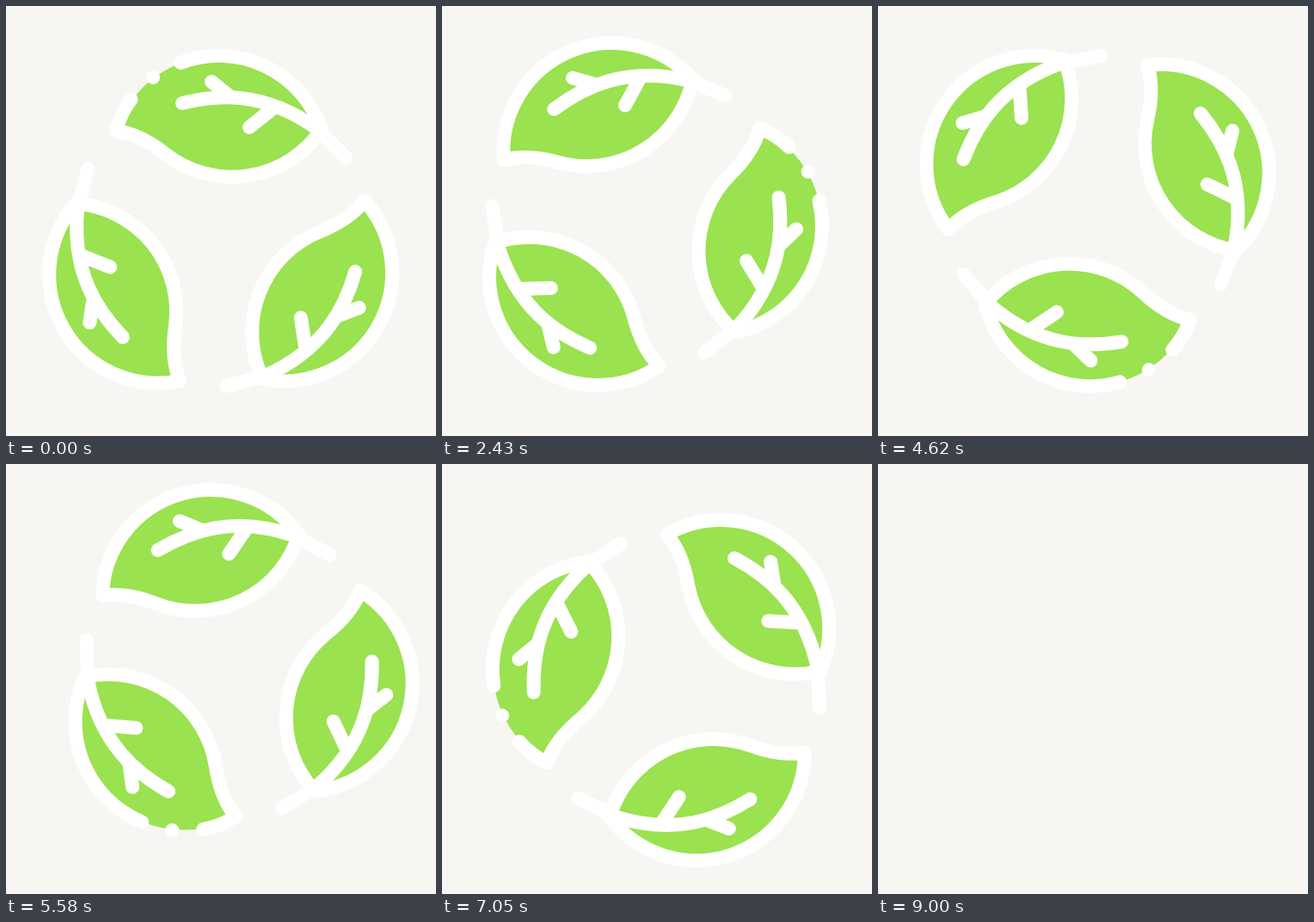
An HTML page for the animation above (9.03 s loop, 500 by 500 pixels).

```html
<!DOCTYPE html>
<html lang="en">
<head>
<meta charset="utf-8">
<title>Leaf cycle</title>
<style>
  html, body { margin: 0; height: 100%; overflow: hidden; background: #f7f6f2; }
  svg { display: block; width: 100vw; height: 100vh; }
</style>
</head>
<body>
<svg viewBox="0 0 500 500" fill="none" stroke="#fff" stroke-width="16" stroke-linecap="round" stroke-linejoin="round">
  <defs>
    <path id="blade" d="M128 145A126 126 0 0 1 367 143.6A126 126 0 0 1 186 172.5C169 159 150 148 128 145Z"/>
    <path id="veins" d="M205 113C245 103 300 98 362 143L395 176M239 88L260 105M283 141L313 117"/>
    <g id="leaf">
      <use href="#blade" fill="#9ae24f"/>
      <use href="#veins"/>
    </g>
  </defs>
  <g id="wheel">
    <!-- leaf with a broken outline -->
    <use href="#blade" fill="#9ae24f" stroke="none"/>
    <path d="M203 66A126 126 0 0 1 367 143.6A126 126 0 0 1 186 172.5C169 159 150 148 128 145Q133 125 145.5 108.5M171 83h.01"/>
    <use href="#veins"/>
    <use href="#leaf" transform="rotate(120 249 269)"/>
    <use href="#leaf" transform="rotate(240 249 269)"/>
  </g>
</svg>
<script>
  const TURN = 9000, STEP = 30, LOOP = TURN + STEP;
  const wheel = document.getElementById('wheel');
  const start = performance.now();

  function draw() {
    const time = (performance.now() - start) % LOOP;
    const t = Math.floor(time / STEP) * STEP;
    wheel.setAttribute('transform', `rotate(${t / TURN * 360} 250 250)`);
    // one empty step closes each turn
    wheel.setAttribute('visibility', t < TURN ? 'visible' : 'hidden');
    requestAnimationFrame(draw);
  }
  draw();
</script>
</body>
</html>
```
